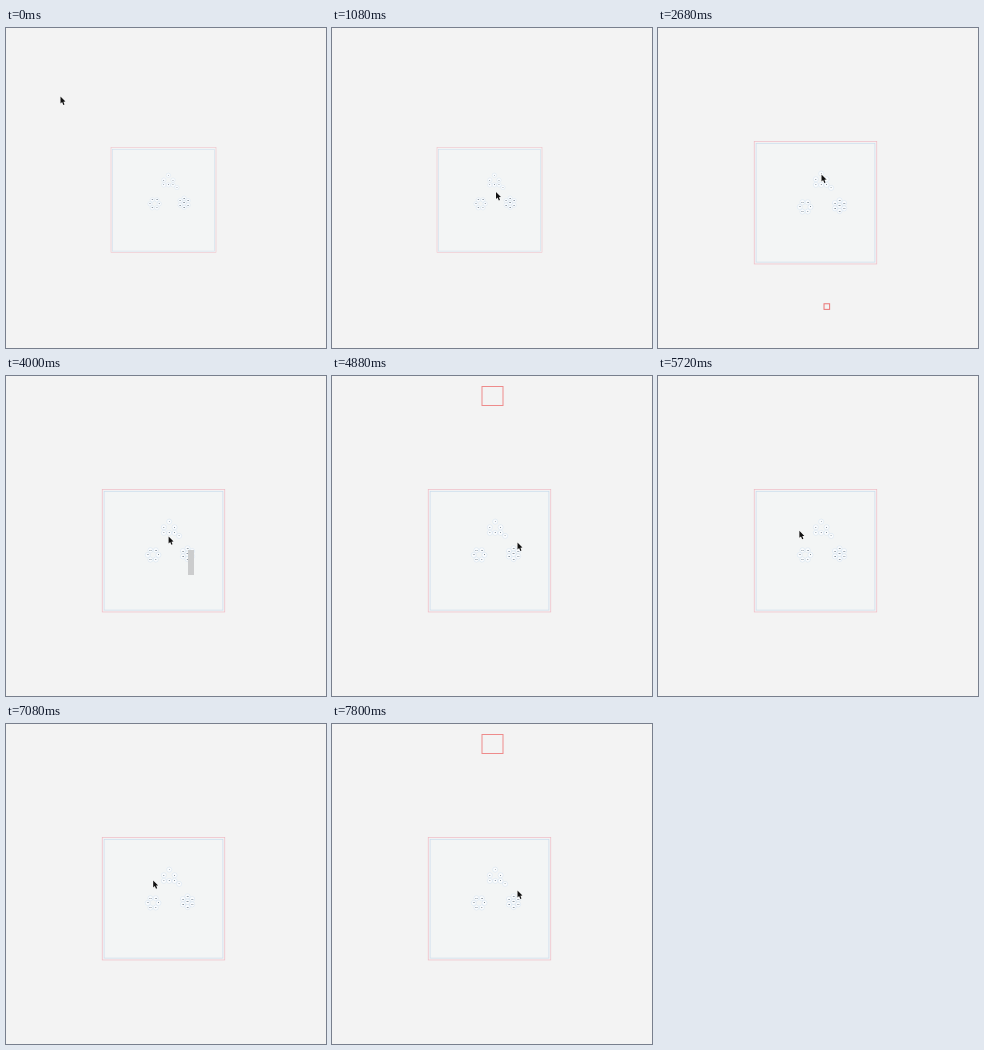
An HTML page with a canvas that plays this animation: 320 by 320 pixels, repeating every 8200 ms.

```html
<!DOCTYPE html>
<html>
<head>
<meta charset="utf-8">
<style>
  html, body { margin: 0; width: 100%; height: 100%; overflow: hidden; background: #f3f3f3; }
  canvas { display: block; width: 100vw; height: 100vh; }
</style>
</head>
<body>
<canvas id="stage"></canvas>
<script>
const LOOP = 8200, SIZE = 320;
const canvas = document.getElementById('stage');
const ctx = canvas.getContext('2d');

// Places the pointer visits
const start = { x: 54.5, y: 68.5 };
const middle = { x: 164, y: 164 };
const triangle = { x: 163.5, y: 146.5 };
const left = { x: 140, y: 154.5 };
const right = { x: 185.5, y: 166.5 };
const zoomed = { x: 185, y: 176 };

const route = [
  { to: middle, from: 200, until: 960 },
  { to: triangle, from: 1080, until: 1200 },
  { to: zoomed, from: 1400, until: 1800 },
  { to: triangle, from: 2280, until: 2640 },
  { to: left, from: 2840, until: 3200 },
  { to: right, from: 3360, until: 3760 },
  { to: left, from: 3800, until: 4200 },
  { to: right, from: 4400, until: 4840 },
  { to: left, from: 5040, until: 5800 },
  { to: right, from: 6920, until: 7560 }
];

const between = (t, from, until) => t >= from && t < until;

function ease(t, from, until) {
  const p = Math.min(1, Math.max(0, (t - from) / (until - from)));
  return p * p * (3 - 2 * p);
}

function pointerAt(t) {
  let { x, y } = start;
  for (const { to, from, until } of route) {
    const e = ease(t, from, until);
    x += (to.x - x) * e;
    y += (to.y - y) * e;
  }
  return { x, y };
}

const zoomAt = t => 1 + 0.533 * ease(t, 1400, 1720) - 0.366 * ease(t, 1880, 2120);

function makeNodes() {
  const list = [];
  for (let row = 0; row < 3; row++) {
    for (let i = 0; i <= row; i++) {
      const side = row ? 2 * i / row - 1 : 0;
      list.push([4.9 + 4.6 * side, -9.9 + 4.8 * row]);
    }
  }
  list.push([13.4, 2.3]);
  const ring = (x, y, turn) => {
    for (let i = 0; i < 6; i++) {
      const a = turn + i * Math.PI / 3;
      list.push([x + 4.6 * Math.cos(a), y + 4.6 * Math.sin(a)]);
    }
  };
  ring(-8.9, 18.6, 0);
  ring(20.6, 17.6, Math.PI / 6);
  list.push([20.6, 17.6]);
  return list;
}
const nodes = makeNodes();

function outline(x, y, w, h, color, width) {
  ctx.strokeStyle = color;
  ctx.lineWidth = width;
  ctx.strokeRect(x, y, w, h);
}

// Square around the centre of the board
const board = (half, color) => outline(-half, 15 - half, 2 * half, 2 * half, color, 0.55);

function drawNodes() {
  ctx.lineWidth = 0.25;
  ctx.strokeStyle = '#b9d3e8';
  ctx.font = 'bold 1.6px "Open Sans", Arial, sans-serif';
  ctx.textAlign = 'center';
  ctx.textBaseline = 'middle';
  nodes.forEach(([x, y], i) => {
    ctx.beginPath();
    ctx.arc(x, y, 2.15, 0, Math.PI * 2);
    ctx.fillStyle = '#fbfcfd';
    ctx.fill();
    ctx.stroke();
    ctx.fillStyle = '#2c4258';
    ctx.fillText(i + 1, x, y);
  });
}

function drawWorld(t) {
  const zoom = zoomAt(t);
  ctx.save();
  ctx.translate(157.5, 157.2);
  ctx.scale(zoom, zoom);
  ctx.fillStyle = '#f3f5f5';
  ctx.fillRect(-51, -36, 102, 102);
  ctx.globalAlpha = Math.min(1, zoom / 1.5);
  board(52.5, '#eda4b2');
  board(50.9, '#b9d2ea');
  ctx.globalAlpha = 1;
  drawNodes();
  if (between(t, 1120, 2860)) outline(7.3, 101.6, 4.8, 4.8, '#ea7474', 0.85);
  ctx.restore();
}

function drawPointer({ x, y }) {
  ctx.save();
  ctx.translate(x, y);
  ctx.lineJoin = 'round';
  ctx.lineWidth = 1;
  ctx.strokeStyle = '#fff';
  ctx.fillStyle = '#111';
  const shape = new Path2D('M0 0V7L1.6 5.6 2.8 8.4 4 7.9 2.9 5.2 5 5.1Z');
  ctx.stroke(shape);
  ctx.fill(shape);
  ctx.restore();
}

function draw(now) {
  const t = now % LOOP;
  const w = Math.round(innerWidth * devicePixelRatio);
  const h = Math.round(innerHeight * devicePixelRatio);
  if (canvas.width !== w || canvas.height !== h) {
    canvas.width = w;
    canvas.height = h;
  }
  ctx.setTransform(w / SIZE, 0, 0, h / SIZE, 0, 0);
  ctx.fillStyle = '#f3f3f3';
  ctx.fillRect(0, 0, SIZE, SIZE);
  drawWorld(t);

  const pointer = pointerAt(t);
  const atRight = Math.hypot(pointer.x - right.x, pointer.y - right.y) < 8;
  if (t > 4200 && atRight) outline(150, 10.5, 21, 19, '#ee8b8b', 1);
  ctx.fillStyle = '#cbcccd';
  if (between(t, 3840, 4080)) ctx.fillRect(182, 174, 6, 25);
  if (between(t, 6400, 6640)) ctx.fillRect(143, 151.7, 48, 1.6);
  drawPointer(pointer);
}

const began = performance.now();
function tick() {
  draw(performance.now() - began);
  requestAnimationFrame(tick);
}
tick();
</script>
</body>
</html>
```
